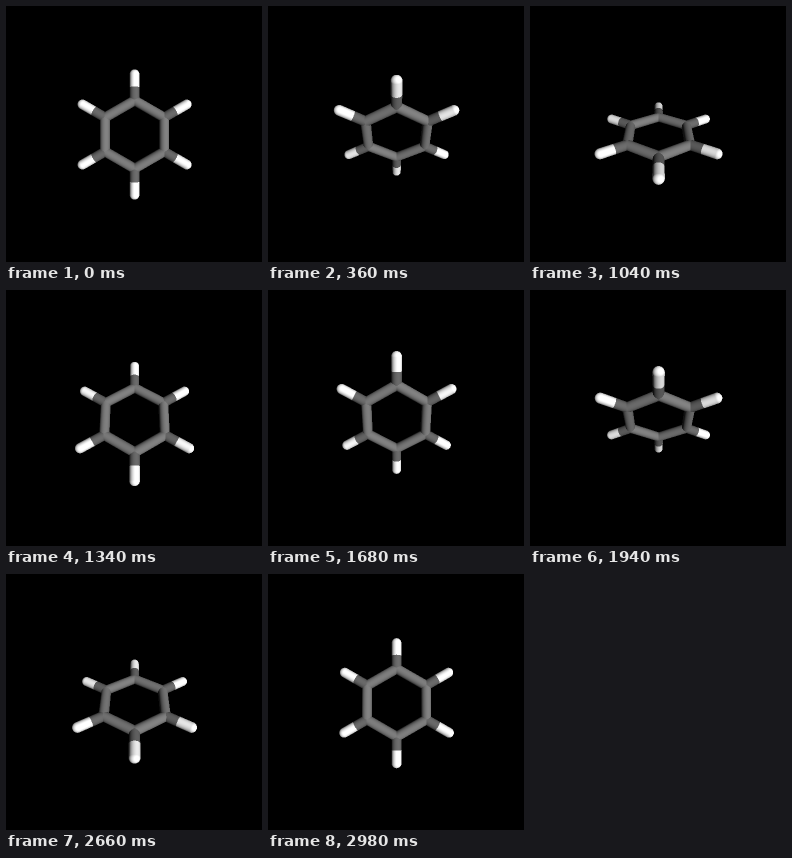
Recreate the animation shown at these times as an HTML page with a canvas. Size 256 by 256 pixels, loop 3000 ms.

```html
<!DOCTYPE html>
<html lang="en">
<head>
<meta charset="utf-8">
<title>Rotating ring molecule</title>
<style>
  html, body { margin: 0; width: 100%; height: 100%; overflow: hidden; background: #000; }
  canvas { display: block; width: 256px; height: 256px; }
</style>
</head>
<body>
<canvas id="stage" width="512" height="512"></canvas>
<script>
const LOOP = 3000, STEP = 20;
const SIZE = 512, SCALE = 2, CENTER = 128.5;
const CAMERA = 225, RADIUS = 5;
const CARBON_R = 34, HYDROGEN_R = 59.9;
const RING = 124, STUB = 104, WHITE = 255;
const LIGHT = [0.4, 0, 0.917];
const AMBIENT = 0.14, DIFFUSE = 0.92, SOFTNESS = 0.7;

const ctx = document.getElementById('stage').getContext('2d');
const image = ctx.createImageData(SIZE, SIZE);
const pixels = new Uint32Array(image.data.buffer);
const depth = new Float32Array(SIZE * SIZE);

const dot = (a, b) => a[0] * b[0] + a[1] * b[1] + a[2] * b[2];
const sub = (a, b) => [a[0] - b[0], a[1] - b[1], a[2] - b[2]];

// Atom i of a flat hexagon, tilted about the horizontal axis.
function atom(i, r, tilt) {
  const a = i * Math.PI / 3;
  const y = r * Math.cos(a);
  return [r * Math.sin(a), y * Math.cos(tilt), y * Math.sin(tilt)];
}

function project(p) {
  const k = CAMERA / (CAMERA - p[2]);
  return [(CENTER + p[0] * k) * SCALE, (CENTER - p[1] * k) * SCALE, RADIUS * k * SCALE + 3];
}

// Ray-casts one round-ended rod into the depth buffer.
function drawRod(a, b, near, far) {
  const pa = project(a), pb = project(b);
  const pad = Math.max(pa[2], pb[2]);
  const x0 = Math.floor(Math.min(pa[0], pb[0]) - pad), x1 = Math.ceil(Math.max(pa[0], pb[0]) + pad);
  const y0 = Math.floor(Math.min(pa[1], pb[1]) - pad), y1 = Math.ceil(Math.max(pa[1], pb[1]) + pad);

  const axis = sub(b, a), eye = [0, 0, CAMERA];
  const oa = sub(eye, a), ob = sub(eye, b);
  const len2 = dot(axis, axis), axisOa = dot(axis, oa), r2 = RADIUS * RADIUS;
  const c = len2 * (dot(oa, oa) - r2) - axisOa * axisOa;

  for (let y = y0; y <= y1; y++) {
    for (let x = x0; x <= x1; x++) {
      const ray = [(x + 0.5) / SCALE - CENTER, CENTER - (y + 0.5) / SCALE, -CAMERA];
      const n = Math.hypot(ray[0], ray[1], ray[2]);
      ray[0] /= n; ray[1] /= n; ray[2] /= n;

      const along = dot(axis, ray);
      const qa = len2 - along * along;
      const qb = len2 * dot(oa, ray) - axisOa * along;
      const disc = qb * qb - qa * c;
      if (disc < 0) continue;

      let t = (-qb - Math.sqrt(disc)) / qa;
      let s = (axisOa + t * along) / len2;
      if (s < 0 || s > 1) {
        const oc = s < 0 ? oa : ob;
        const half = dot(ray, oc);
        const h = half * half - dot(oc, oc) + r2;
        if (h < 0) continue;
        t = -half - Math.sqrt(h);
        s = s < 0 ? 0 : 1;
      }

      const at = y * SIZE + x;
      if (t >= depth[at]) continue;
      depth[at] = t;

      let lit = 0;
      for (let k = 0; k < 3; k++) {
        lit += LIGHT[k] * (eye[k] + ray[k] * t - a[k] - axis[k] * s) / RADIUS;
      }
      const shade = AMBIENT + DIFFUSE * Math.pow(Math.max(0, lit), SOFTNESS);
      const v = Math.min(255, Math.round((s < 0.5 ? near : far) * shade));
      pixels[at] = (0xff000000 | v << 16 | v << 8 | v) >>> 0;
    }
  }
}

function render(time) {
  const tilt = 2 * Math.PI * time / LOOP;
  pixels.fill(0xff000000);
  depth.fill(Infinity);
  for (let i = 0; i < 6; i++) {
    const carbon = atom(i, CARBON_R, tilt);
    drawRod(carbon, atom(i + 1, CARBON_R, tilt), RING, RING);
    drawRod(carbon, atom(i, HYDROGEN_R, tilt), STUB, WHITE);
  }
  ctx.putImageData(image, 0, 0);
}

const start = performance.now();
let shown = -1;
function tick() {
  const elapsed = Math.max(0, performance.now() - start) % LOOP;
  const time = Math.floor(elapsed / STEP) * STEP;
  if (time !== shown) render(shown = time);
  requestAnimationFrame(tick);
}
tick();
</script>
</body>
</html>
```
